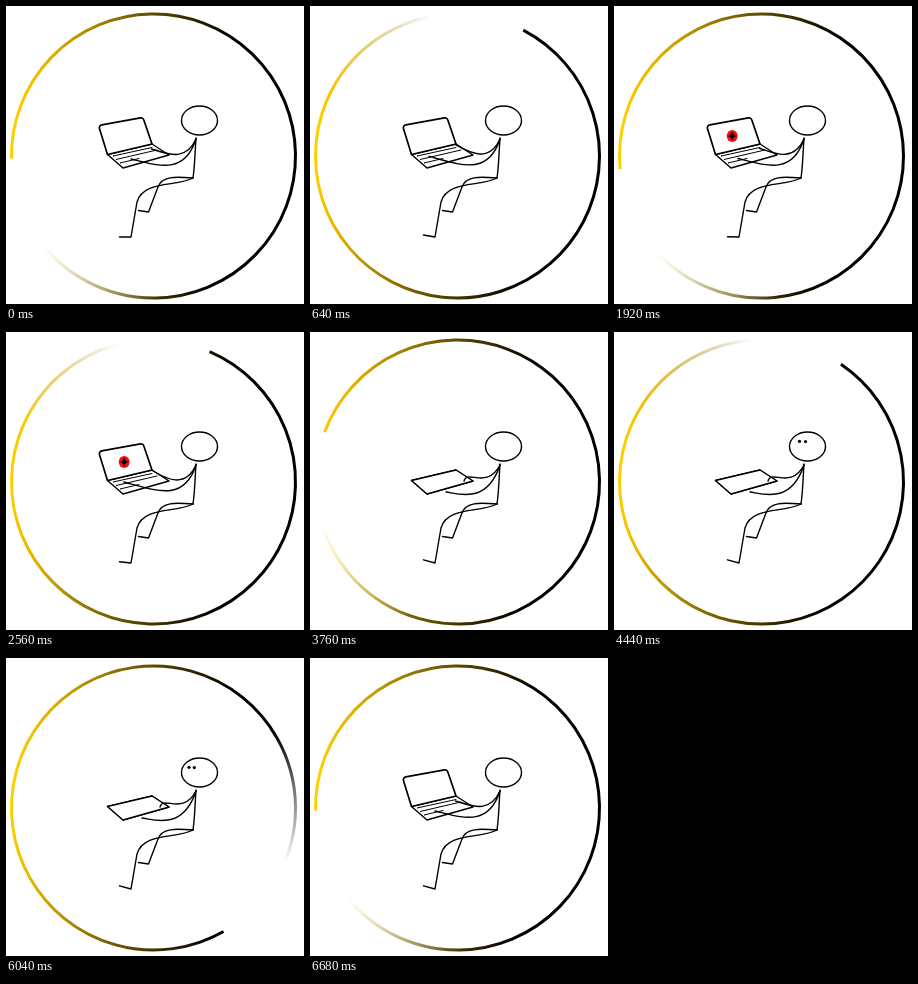
An HTML page with a canvas for the animation above (6720 ms loop, 298 by 298 pixels).

```html
<!DOCTYPE html>
<html lang="en">
<head>
<meta charset="utf-8">
<title>Laptop loader</title>
<style>
  html, body { margin: 0; width: 100%; height: 100%; overflow: hidden; background: #fff; }
  canvas { display: block; width: 298px; height: 298px; }
</style>
</head>
<body>
<canvas id="stage"></canvas>
<script>
const SIZE = 298, LOOP = 6720, STEP = 40, SPIN_TIME = 6680, TURNS = 7;
const TAU = Math.PI * 2, RAD = Math.PI / 180;
const canvas = document.getElementById('stage');
const ctx = canvas.getContext('2d');
const ratio = window.devicePixelRatio || 1;
canvas.width = canvas.height = SIZE * ratio;
ctx.scale(ratio, ratio);

const clamp = v => Math.max(0, Math.min(1, v));
const lerp = (a, b, k) => a + (b - a) * k;
const mix = (p, q, k) => [lerp(p[0], q[0], k), lerp(p[1], q[1], k)];
const ease = (t, from, to) => {
  const k = clamp((t - from) / (to - from));
  return k * k * (3 - 2 * k);
};

function line(points, width = 1.4, closed = false) {
  ctx.beginPath();
  points.forEach(p => ctx.lineTo(p[0], p[1]));
  if (closed) ctx.closePath();
  ctx.lineWidth = width;
  ctx.stroke();
}

function curve(from, c1, c2, to, ...rest) {
  ctx.beginPath();
  ctx.moveTo(...from);
  ctx.bezierCurveTo(...c1, ...c2, ...to);
  rest.forEach(p => ctx.lineTo(...p));
  ctx.lineWidth = 1.4;
  ctx.stroke();
}

function dot(x, y, rx, ry = rx, color = '#000') {
  ctx.fillStyle = color;
  ctx.beginPath();
  ctx.ellipse(x, y, rx, ry, 0, 0, TAU);
  ctx.fill();
}

function drawRing(t) {
  const cx = 147.5, cy = 150, r = 142;
  const head = 179 * RAD - TAU * TURNS * t / SPIN_TIME;
  const paint = ctx.createLinearGradient(5, 143, 215, 161);
  paint.addColorStop(0, '#ffd000');
  paint.addColorStop(0.12, '#e6b800');
  paint.addColorStop(0.5, '#7a6200');
  paint.addColorStop(1, '#000');
  ctx.lineCap = 'butt';
  ctx.lineWidth = 3;
  ctx.strokeStyle = paint;
  ctx.beginPath();
  ctx.arc(cx, cy, r, head, head + 328 * RAD);
  ctx.stroke();

  // White veil that dissolves the tail
  const veil = ctx.createConicGradient(head, cx, cy);
  veil.addColorStop(0, 'rgba(255,255,255,0)');
  veil.addColorStop(268 / 360, 'rgba(255,255,255,0)');
  veil.addColorStop(322 / 360, 'rgba(255,255,255,1)');
  veil.addColorStop(1, 'rgba(255,255,255,1)');
  ctx.strokeStyle = veil;
  ctx.lineWidth = 5;
  ctx.beginPath();
  ctx.arc(cx, cy, r, head + 260 * RAD, head + 330 * RAD);
  ctx.stroke();
}

function drawLaptop(t, shut) {
  const left = [101.5, 148.5], right = [146, 138];
  const frontL = [117, 162], frontR = [163, 149];
  line([left, right, frontR, frontL], 1.4, true);
  if (shut < 1) {
    line([[107, 150], [146, 141.5]], 1);
    line([[110, 153.5], [151, 144]], 1);
    line([[114, 157], [133, 152.5]], 1);
  }

  const lift = Math.sin(shut * Math.PI) * 8;
  const topL = mix([92.5, 119.5], frontL, shut);
  const topR = mix([137, 111.5], frontR, shut);
  topL[1] -= lift;
  topR[1] -= lift;
  const round = 3 * (1 - shut);
  ctx.beginPath();
  ctx.moveTo(...left);
  ctx.arcTo(...topL, ...topR, round);
  ctx.arcTo(...topR, ...right, round);
  ctx.lineTo(...right);
  ctx.closePath();
  ctx.fillStyle = '#fff';
  ctx.fill();
  ctx.lineWidth = lerp(1.7, 1.3, shut);
  ctx.stroke();

  if (t >= 1920 && t < 3000) {
    dot(118.2, 130, 5.5, 6, '#f50d0d');
    dot(118.2, 130, 2.4);
    line([[115, 130], [121.4, 130]], 1.2);
    line([[118.2, 126.6], [118.2, 133.4]], 1.2);
  }
}

function drawArms(t, shut) {
  const beat = Math.cos(TAU * (t < 4000 ? t : t - SPIN_TIME) / 394);
  const shoulder = [190, 133];
  const far = mix([145.5, 140.5 + 2.5 * beat], [154, 149], shut);
  const near = mix([121.5 + 3.5 * beat, 151.5 + 1.5 * beat], [136, 160], shut);
  curve(far,
    mix([160, 147], [157, 137], shut),
    mix([179, 157], [177, 158], shut), shoulder);
  curve(near,
    mix([151, 159], [150, 162], shut),
    mix([178, 170], [177, 172], shut), shoulder);
}

function drawPerson(t) {
  ctx.beginPath();
  ctx.ellipse(193.5, 114.5, 18, 14.5, 0, 0, TAU);
  ctx.lineWidth = 1.4;
  ctx.stroke();

  const hip = [187, 172];
  curve([190, 132], [189, 145], [189, 158], hip);
  curve(hip, [172, 171], [156, 169], [152, 181], [142.5, 206], [132.5, 204.5]);

  const tap = t < 3000 ? 229.5 + 1.5 * Math.cos(TAU * t / 920) : 227.8;
  curve(hip, [171, 181], [137, 174], [131, 196], [125, 231], [113.5, tap]);

  if (t >= 4300 && t < 6200) {
    const look = ease(t, 5480, 5720);
    dot(lerp(185.5, 183, look), 109.3, 1.6);
    dot(lerp(191.5, 188.3, look), 109.6, 1.6);
  }
}

function draw(t) {
  ctx.fillStyle = '#fff';
  ctx.fillRect(0, 0, SIZE, SIZE);
  drawRing(t);
  ctx.strokeStyle = '#000';
  ctx.lineCap = ctx.lineJoin = 'round';
  const shut = ease(t, 3000, 3320) - ease(t, 6280, 6560);
  drawLaptop(t, shut);
  drawPerson(t);
  drawArms(t, shut);
}

const start = performance.now();
function tick() {
  const t = (performance.now() - start) % LOOP;
  draw(Math.floor(t / STEP) * STEP);
  requestAnimationFrame(tick);
}
tick();
</script>
</body>
</html>
```
